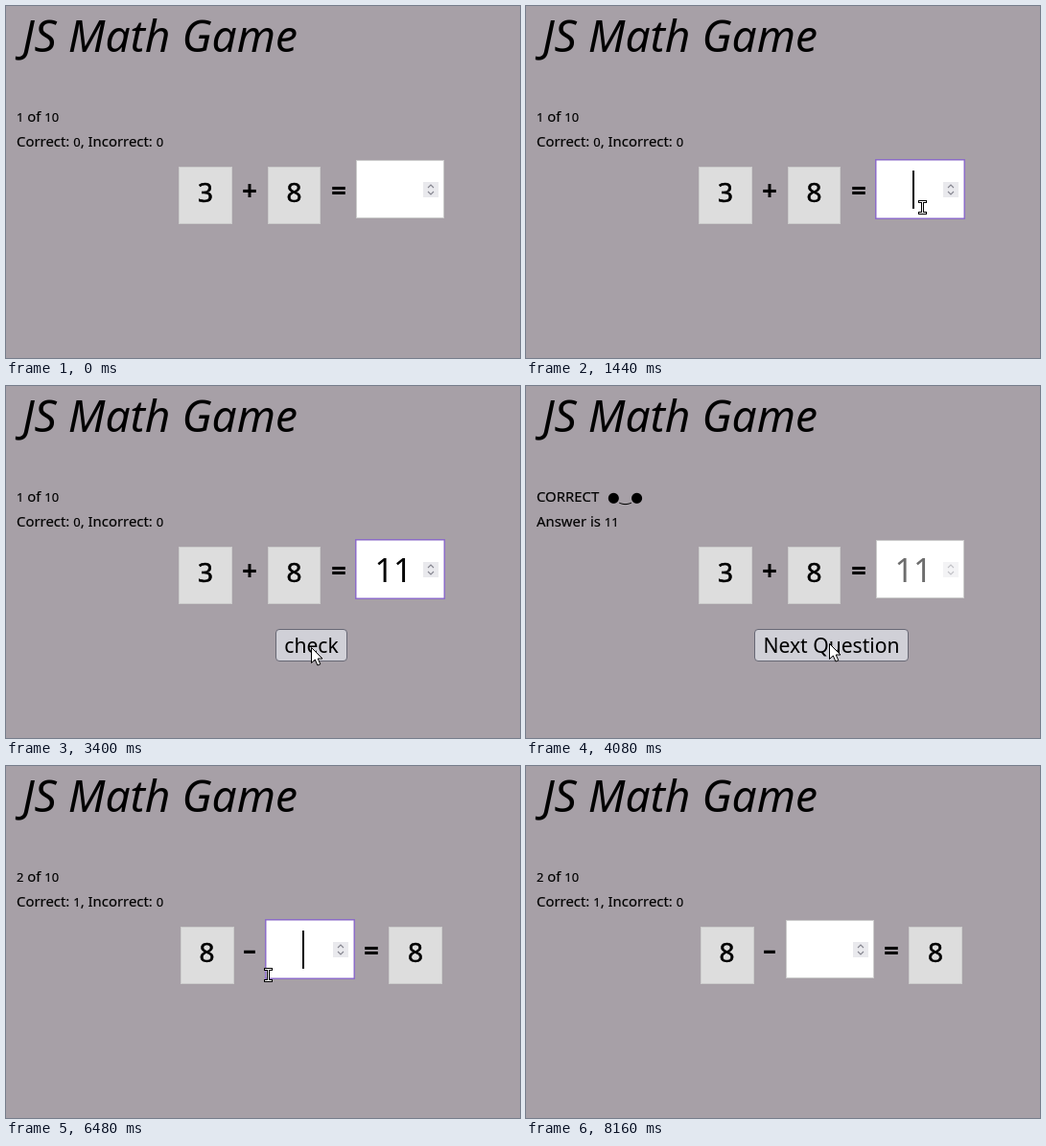
An HTML page that plays this animation: 536x368 px, repeating every 8760 ms.

```html
<!DOCTYPE html>
<html lang="en">
<head>
<meta charset="utf-8">
<title>JS Math Game</title>
<style>
  html, body { margin: 0; width: 100%; height: 100%; overflow: hidden; background: #a7a0a7; }
  svg { display: block; width: 536px; height: 368px; font-family: "Noto Sans", sans-serif; }
  .title { font-size: 46px; font-style: italic; }
  .status { font-size: 14.9px; stroke: #000; stroke-width: .15; }
  .num { font-size: 13px; }
  .face { font: 14.5px "DejaVu Sans", sans-serif; }
  .mid { text-anchor: middle; }
  .box { fill: #ddd; stroke: #ccc; }
  .digit { font-size: 28px; stroke: #000; stroke-width: .6; }
  .op { font-size: 28px; font-weight: 700; }
  .answer { font-size: 34px; }
  .label { font-size: 21.1px; }
  .chevrons { fill: none; stroke: #85858f; stroke-width: 1.1; }
  .disabled .answer { fill: #6d6d6d; }
  .disabled .spinner { opacity: .5; }
</style>
</head>
<body>
<svg viewBox="0 0 536 368">
  <rect width="536" height="368" fill="#a7a0a7"/>
  <text class="title" x="17" y="47.5">JS Math Game</text>
  <text class="status" id="line1" x="11" y="121"></text>
  <text class="status" id="line2" x="11" y="147"></text>
  <text class="face" id="face" x="85" y="121">●‿●</text>

  <g id="question1">
    <rect class="box" x="180.5" y="168.5" width="55" height="59"/>
    <rect class="box" x="273.5" y="168.5" width="54" height="59"/>
    <text class="digit mid" x="208" y="205">3</text>
    <text class="op mid" x="254" y="203">+</text>
    <text class="digit mid" x="300.5" y="205">8</text>
    <text class="op mid" x="347" y="202.5">=</text>
  </g>
  <g id="question2">
    <rect class="box" x="182.5" y="168.5" width="55" height="59"/>
    <rect class="box" x="399.5" y="168.5" width="55" height="59"/>
    <text class="digit mid" x="209.5" y="205">8</text>
    <text class="op mid" x="254" y="202">–</text>
    <text class="op mid" x="381" y="202.5">=</text>
    <text class="digit mid" x="427" y="205">8</text>
  </g>

  <g id="field">
    <rect x="365.5" y="161.5" width="91" height="60" fill="#fff" stroke="#ccc"/>
    <rect id="focus" x="364.75" y="160.75" width="92.5" height="61.5" fill="#fff" stroke="#8c6cc8" stroke-width="1.5"/>
    <g class="spinner">
      <rect x="435" y="184" width="16" height="16" fill="#e9e9ed"/>
      <path class="chevrons" d="M440 190l3-3 3 3M440 194l3 3 3-3"/>
    </g>
    <text class="answer mid" id="answer" x="404" y="205"></text>
    <rect id="caret" y="172" width="2" height="40"/>
  </g>

  <g id="button">
    <rect id="plate" y="254.5" height="33" rx="3.5"/>
    <text class="label mid" id="label" y="279"></text>
  </g>

  <path id="arrow" d="M.5.5V16.5L4.3 13L6.9 19L9.8 17.8L7.2 12H12Z" fill="#fff" stroke="#000"/>
  <g id="beam" fill="none">
    <path d="M-4-5.5H5M-4 6.5H5M.5-5.5V6.5" stroke="#000" stroke-width="3"/>
    <path d="M-3-5.5H4M-3 6.5H4M.5-5.5V6.5" stroke="#fff"/>
  </g>
</svg>
<script>
  const LOOP = 8760, STEP = 40;
  const $ = id => document.getElementById(id);
  const show = (id, on) => { $(id).style.display = on ? '' : 'none'; };
  const place = (id, x, y) => $(id).setAttribute('transform', `translate(${x} ${y})`);
  const within = (t, from, to) => t >= from && t < to;

  // Pointer path: time, x, y
  const path = [
    [0, 86, -40], [360, 86, -40], [400, 94, -10], [640, 300, 138], [880, 414, 222],
    [1040, 414, 222], [1280, 413, 210], [2840, 413, 210], [2880, 409, 212],
    [3200, 321, 281], [3320, 321, 281], [3440, 316, 269], [6320, 316, 269],
    [6480, 273, 218], [7200, 77, -15], [7320, 72, -22], [LOOP, 72, -22]
  ];

  const buttons = {
    check: { x: 281.5, width: 74 },
    'Next Question': { x: 238.5, width: 160 }
  };
  const looks = {
    idle: ['#e9e9ed', '#8f8f9d'],
    hover: ['#d0d0d7', '#676774'],
    active: ['#b1b1b9', '#484851']
  };

  function pointerAt(t) {
    const i = path.findIndex(p => p[0] > t);
    const [t0, x0, y0] = path[i - 1], [t1, x1, y1] = path[i];
    const k = (t - t0) / (t1 - t0);
    return [x0 + (x1 - x0) * k, y0 + (y1 - y0) * k];
  }

  function setStatus(id, text) {
    if ($(id).dataset.text === text) return;
    $(id).dataset.text = text;
    $(id).innerHTML = text.replace(/\d+/g, '<tspan class="num">$&</tspan>');
  }

  function drawButton(name, look) {
    show('button', name);
    if (!name) return;
    const { x, width } = buttons[name], [fill, stroke] = looks[look];
    Object.entries({ x, width, fill, stroke }).forEach(([k, v]) => $('plate').setAttribute(k, v));
    $('label').setAttribute('x', x + width / 2);
    $('label').textContent = name;
  }

  function draw(t) {
    const [x, y] = pointerAt(t);
    const second = t >= 5760, solved = within(t, 4080, 5760);
    const shift = second ? -94 : 0;

    setStatus('line1', solved ? 'CORRECT' : `${second ? 2 : 1} of 10`);
    setStatus('line2', solved ? 'Answer is 11' : `Correct: ${second ? 1 : 0}, Incorrect: 0`);
    show('face', solved);
    show('question1', !second);
    show('question2', second);

    const typed = within(t, 2360, 5760) ? (t < 2480 ? '1' : '11') : '';
    place('field', shift, 0);
    $('field').setAttribute('class', solved ? 'disabled' : '');
    $('answer').textContent = typed;
    show('focus', within(t, 1440, 4080) || within(t, 5760, 8160));
    show('caret', within(t, 1440, 2600) || within(t, 3800, 4080) || within(t, 5760, 6960));
    $('caret').setAttribute('x', [403, 412, 422][typed.length]);

    const name = within(t, 2360, 4080) ? 'check' : solved ? 'Next Question' : '';
    const over = name && y >= 254 && y < 288 && x >= buttons[name].x && x < buttons[name].x + buttons[name].width;
    const pressed = within(t, 4000, 4080) || within(t, 5600, 5760);
    drawButton(name, pressed ? 'active' : over ? 'hover' : 'idle');

    const inField = !solved && x >= 365 + shift && x < 457 + shift && y >= 161 && y <= 222;
    const px = Math.round(x), py = Math.round(y);
    show('beam', inField);
    show('arrow', !inField);
    place('beam', px, py);
    place('arrow', px, py);
  }

  function frame(now) {
    const t = now % LOOP;
    draw(Math.floor(t / STEP) * STEP);
    requestAnimationFrame(frame);
  }
  draw(0);
  requestAnimationFrame(frame);
</script>
</body>
</html>
```
